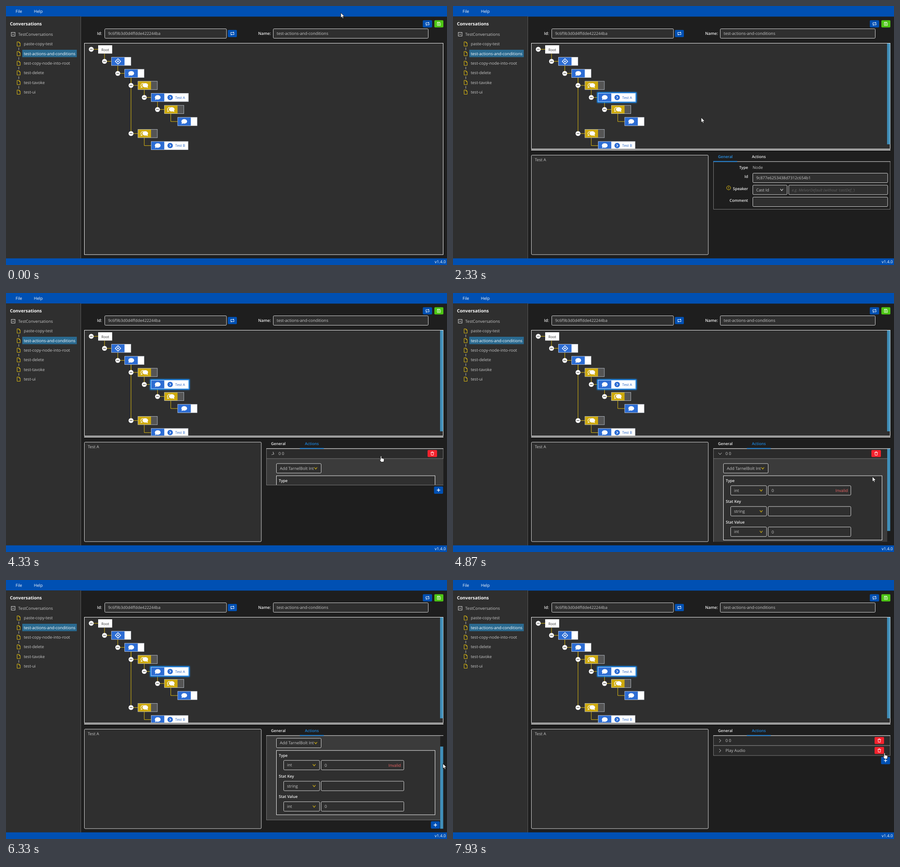
These frames come from a looping animation (976 px wide and 574 px high, 8000 ms). An HTML page:

```html
<!DOCTYPE html>
<html lang="en">
<head>
<meta charset="utf-8">
<title>Conversation editor</title>
<style>
html, body { margin: 0; width: 100%; height: 100%; overflow: hidden; background: #1e1e1e; }
svg { display: block; width: 976px; height: 574px; }
text { font-family: "Open Sans", "Noto Sans", sans-serif; text-rendering: geometricPrecision; white-space: pre; }
</style>
</head>
<body>
<svg id="stage" viewBox="0 0 976 574" xmlns="http://www.w3.org/2000/svg"></svg>
<script>
const BLUE = '#0050b3', PANEL = '#2f2f2f', EDGE = '#d4d4d4', DIM = '#7a7a7a';
const GOLD = '#e0bd12', NODE = '#2c6cd3', SOFT = '#c6c6c6', RED = '#f5222d';

// drawing helpers
const rect = (x, y, w, h, fill, more = '') =>
  `<rect x="${x}" y="${y}" width="${w}" height="${h}" fill="${fill}" ${more}/>`;
const text = (x, y, s, fill = SOFT, size = 9, more = '') =>
  `<text x="${x}" y="${y}" fill="${fill}" font-size="${size}" ${more}>${s}</text>`;
const line = (d, color, w = 1, more = '') =>
  `<path d="${d}" fill="none" stroke="${color}" stroke-width="${w}" ${more}/>`;
const at = (x, y, body) => `<g transform="translate(${x} ${y})">${body}</g>`;
const group = (id, body, more = '') => `<g id="${id}" ${more}>${body}</g>`;
const clip = (id, x, y, w, h) => `<clipPath id="${id}">${rect(x, y, w, h, '#fff')}</clipPath>`;
const bold = 'font-weight="600"', end = 'text-anchor="end"';
const label = (x, y, s, more = '') => text(x, y, s, '#f0f0f0', 8.6, bold + ' ' + more);
const field = (x, y, w, h = 21) => rect(x, y, w, h, PANEL, `stroke="${EDGE}" rx="2"`);
const chevron = (x, y, color) => line(`M${x - 3} ${y - 2}l3 4 3-4`, color, 1.1);
const select = (x, y, w, s, color = GOLD) =>
  field(x, y, w) + text(x + 7.5, y + 13.7, s) + chevron(x + w - 12, y + 10.4, color);
const button = (x, y, w, h, fill, icon) =>
  rect(x, y, w, h, fill, 'rx="2"') + at(x + w / 2, y + h / 2, icon);

// icons, centred on 0,0
const loopIcon = line('M-3.6 .6V-2.3H2.6M3.6-.6V2.3H-2.6', '#fff') +
  '<path d="M2-4.2L4.2-2.3 2-.4ZM-2 4.2L-4.2 2.3-2 .4Z" fill="#fff"/>';
const saveIcon = line('M-3.5-3.5H2L3.5-2V3.5H-3.5ZM-1.8-3.5V-1.5H1.4V-3.5', '#fff', .9) +
  '<circle cy="1.2" r="1.1" fill="none" stroke="#fff" stroke-width=".8"/>';
const fileIcon = line('M-3.4-4.7H.8L3.4-2.1V4.7H-3.4ZM.8-4.7V-2.1H3.4', GOLD);
const trashIcon = line('M-3.7-2.2H3.7M-1.4-2.4V-3.8H1.4V-2.4M-2.7-2L-2.3 3.7H2.3L2.7-2', '#fff', .9);
const plusIcon = line('M-3.7 0H3.7M0-3.7V3.7', '#fff', 1.4);
const bubble = '<ellipse cy="-.2" rx="6.3" ry="5" fill="#fff"/><path d="M-5.4 2Q-5 4-6.2 5.6-4 5.4-2.4 4Z" fill="#fff"/>';
const bubbles = line('M-2-4.6A5 4.4 0 0 0-6.8 2.4L-7.6 4.6-4.2 3.6', '#fff', 1.1) +
  '<ellipse cx="1.7" cy="-.3" rx="6.2" ry="4.8" fill="#fff"/><path d="M6.8 2Q6.5 4 7.6 5.4 5.4 5.2 3.8 4Z" fill="#fff"/>';
const target = line('M0-6L6 0 0 6-6 0Z', '#fff', 1.4) + '<path d="M0-2.2L2.2 0 0 2.2-2.2 0Z" fill="#fff"/>';
const goIcon = `<circle r="6" fill="${NODE}"/>` + line('M-1.2-2.4L1.4 0-1.2 2.4', '#fff', 1.2);

// node tree
const rowY = r => 96 + r * 26.67;
const colX = c => 204 + c * 29.33;
const knob = c => at(colX(c) - 15.3, rowY(c), '<circle r="5.4" fill="#fff"/>' + line('M-3 0H3', '#333', 1.1));
const stem = (c, r0, r1) => line(`M${colX(c) - 15.3} ${rowY(r0) + 9.5}V${rowY(r1)}H${colX(c)}`, GOLD);
function node(c, r, icon, s = '', gold = icon === bubbles) {
  const x = colX(c), y = rowY(r) - 9.2, w = s ? (s.endsWith('A') ? 82.5 : 81.7) : 43;
  return rect(x, y, w, 18.4, gold ? '#555' : '#fff') + rect(x, y, 29, 18.4, gold ? '#cda90c' : NODE) +
    at(x + 14.5, y + 9.2, icon) + rect(x, y, w, 18.4, 'none', 'stroke="#c4cbd6" stroke-width=".8"') +
    (s ? at(x + 42, y + 9.2, goIcon) + text(x + 53.3, y + 12.2, s, '#1d5fc4', 7.8) : '');
}
const chain = [0, 1, 2, 3, 4, 5];
const halo = (w, more = '') => rect(320.8, 193, 83.6, 19.4, 'none', `stroke="#1890ff" stroke-width="${w}" ${more}`);
const tree = line('M188 96H204', GOLD) + chain.map(c => stem(c + 1, c, c + 1)).join('') +
  stem(3, 2, 7) + stem(4, 7, 8) + chain.map(knob).join('') + at(colX(3) - colX(7), 0, knob(7)) +
  rect(204, 87, 31, 18.4, '#fff') + text(211, 99.5, 'Root', '#333', 8) +
  node(1, 1, target) + node(2, 2, bubble) + node(3, 3, bubbles) +
  group('glow', halo(4, 'filter="url(#blur)"') + halo(2)) +
  node(4, 4, bubble, 'Test A') + node(5, 5, bubbles) + node(6, 6, bubble) +
  node(3, 7, bubbles) + node(4, 8, bubble, 'Test B');

// sidebar
const files = ['paste-copy-test', 'test-actions-and-conditions', 'test-copy-node-into-root',
  'test-delete', 'test-tavoke', 'test-ui'];
const sidebar = rect(0, 23, 165, 537, PANEL) + rect(165, 23, 1, 537, '#5a5a5a') +
  text(8.7, 43.2, 'Conversations', '#fff', 9.9, 'font-weight="700"') +
  rect(11.8, 58.5, 8.2, 8.2, 'none', 'stroke="#ddd"') + line('M13.8 62.6H18', '#ddd') +
  text(27, 66.2, 'TestConversations') + rect(36, 97, 120.7, 16.4, '#2a6a90') +
  files.map((s, i) => {
    const y = 84.2 + i * 21.33;
    return at(28, y, fileIcon) + text(39.4, y + 3.2, s, i === 1 ? '#fff' : SOFT) +
      (i ? line(`M28.3 ${y - 13.4}v5.6`, '#bdbdbd') : '');
  }).join('');

const frame = rect(0, 0, 976, 23.5, BLUE) + text(21.3, 15.3, 'File', '#fff') + text(61.8, 15.3, 'Help', '#fff') +
  sidebar + button(922.5, 31.5, 20.5, 16, BLUE, loopIcon) + button(948, 31.5, 20, 16, '#4cc514', saveIcon) +
  text(201.5, 64, 'Id:', '#f0f0f0', 9, bold) + field(218.5, 50.5, 269.5) +
  text(226, 64.2, '9c6f9b3d0d4ffdde422244ba', SOFT, 8.82) + button(491, 53, 20, 16, BLUE, loopIcon) +
  text(558, 64, 'Name:', '#f0f0f0', 9, bold) + field(591.5, 50.5, 343) +
  text(599, 64.2, files[1]) +
  rect(0, 559.3, 976, 14.7, BLUE) + text(973.5, 570, 'v1.4.0', '#fff', 9, end);

// lower panes
const general = line('M576.5 345V450.5H967.5V345', DIM) +
  label(653, 361.2, 'Type', end) + text(663, 361.4, 'Node') +
  label(653, 381.2, 'Id', end) + field(663.5, 370.5, 298.5) + text(671, 384.3, '9c877e6253438d7312c654b1', SOFT, 8.87) +
  label(653, 407.6, 'Speaker', end) +
  at(610, 403, `<circle r="4.4" fill="none" stroke="${GOLD}"/>` + line('M0-2.5V.7M0 1.6V2.6', GOLD, 1.1)) +
  select(663.5, 397, 76, 'Cast Id', '#ddd') + field(743, 397, 219) +
  text(750, 410.7, "e.g. MelvorDefault (without 'castDef_')", '#626262', 8.5, 'font-style="italic"') +
  label(653, 434.4, 'Comment', end) + field(663.5, 423.5, 298.5);

const statRow = (y, name, type, value) => label(603.7, y, name) +
  select(614.5, y + 8, 79.5, type) + field(697.5, y + 8, 183) + text(705, y + 21.9, value);
const body = rect(576, 367, 392, 192, '#3b3b3b') + select(598.5, 378, 99, 'Add TarnelBolt Int') +
  rect(598.5, 405, 351, 142.5, PANEL, 'stroke="#eee"') +
  statRow(419, 'Type', 'int', '0') + text(874, 440.8, 'Invalid', '#f06464', 9, end) +
  statRow(465.2, 'Stat Key', 'string', '') + statRow(510.6, 'Stat Value', 'int', '0');
const header = (y, s) => rect(576.5, y, 391, 22, '#2b2b2b', `stroke="${DIM}"`) + text(603, y + 14, s);
const trash = y => button(933, y + 3, 21, 15.6, RED, trashIcon);
const mark = line('M-2-3.6L2 0-2 3.6', SOFT);
const actions = group('body', body, 'clip-path="url(#fold)"') +
  header(345, '0 0') + group('mark', mark) + group('bin', trash(345)) +
  line('M576.5 345V559', DIM, 1, 'id="sideLine"') + line('M576 0H968', DIM, 1, 'id="endLine"') +
  group('second', header(367, 'Play Audio') + at(591, 378.1, mark) + trash(367)) +
  group('add', button(947.3, 3, 20, 16.3, BLUE, plusIcon));

const split = rect(173, 318, 795, 2, '#dcdcdc') + rect(960.7, 83, 6.6, 223.5, '#408fba') +
  field(173.5, 330.5, 391.5, 220.5) + text(181, 344.2, 'Test A') +
  label(586.5, 337, 'General', 'id="tabA"') + label(661.5, 337, 'Actions', 'id="tabB"') +
  '<g clip-path="url(#pane)">' + group('slide', general + at(392, 0, group('actions', actions))) +
  rect(961, 345, 7, 206.5, '#1e1e1e', 'id="track"') + rect(961, 345, 6.6, 182.3, '#408fba', 'id="thumb"') + '</g>' +
  rect(576, 344.3, 392, 1, '#e4e4e4') + rect(576, 343.6, 53, 1.8, '#1b86e0', 'id="ink"');

const shape = d => `<path d="${d}" fill="#fff" stroke="#111" stroke-width=".85"/>`;
const arrow = shape('M0 0V11.2L2.6 8.8 4.2 12.6 6 11.8 4.4 8.1H8Z');
const hand = shape('M-1.1 1A1.1 1 0 0 1 1.1 1V5L3 5.2 5 5.8Q6.8 5.8 6.8 7.4V10L5.7 13.6H.3L-3 9Q-3.4 7.6-2 7.6L-1.1 8.5Z');

document.getElementById('stage').innerHTML =
  '<defs><filter id="blur" x="-20%" y="-60%" width="140%" height="220%"><feGaussianBlur stdDeviation="1.6"/></filter>' +
  clip('view', 173, 82, 795, 470) + clip('pane', 576, 344, 392, 207.5) + clip('fold', 576, 367, 392, 192) + '</defs>' +
  rect(0, 0, 976, 574, '#1e1e1e') + frame +
  rect(173.5, 82.5, 794, 468.5, PANEL, 'stroke="#f0f0f0" id="box"') +
  `<g clip-path="url(#view)">${tree}</g>` + group('split', split) +
  group('cursor', group('arrow', arrow) + group('hand', hand));

const $ = id => document.getElementById(id);
const set = (id, name, v) => $(id).setAttribute(name, v);
const show = (id, on) => set(id, 'visibility', on ? 'inherit' : 'hidden');
const move = (id, x, y) => set(id, 'transform', `translate(${x} ${y})`);
const clipHeight = (id, h) => $(id).firstChild.setAttribute('height', h);
const clamp = v => Math.max(0, Math.min(1, v));
const ease = u => (u = clamp(u), u < .5 ? 4 * u ** 3 : 1 - 4 * (1 - u) ** 3);

// pointer moves: start, end, x, y; it rests in between
const moves = [
  [67, 200, 947, 118], [200, 267, 1010, 160], [533, 600, 966, 318], [600, 1267, 430, 218],
  [1267, 1400, 400, 209], [1400, 1466, 390, 204.5], [2000, 2066, 400, 208], [2066, 2333, 549, 247],
  [2333, 2667, 723, 342], [2667, 2866, 686, 338], [3533, 4000, 829, 360], [4067, 4133, 830, 361],
  [4533, 4866, 928, 407], [4866, 5133, 966, 383], [5267, 5667, 967, 409], [5667, 6133, 967, 407],
  [6333, 6533, 966, 362], [6666, 7066, 857, 356], [7333, 7866, 955, 383]
];
const overLink = t => t > 1460 && t < 2030 || t > 2900 && t < 4560 || t > 6700;
function pointer(t) {
  let x = 741, y = 15;
  for (const [t0, t1, toX, toY] of moves) {
    const u = clamp((t - t0) / (t1 - t0));
    x += (toX - x) * u;
    y += (toY - y) * u;
    if (u < 1) break;
  }
  return { x, y };
}

function draw(t) {
  const p = pointer(t);
  move('cursor', p.x, p.y);
  show('arrow', !overLink(t));
  show('hand', overLink(t));

  set('glow', 'opacity', t < 1460 ? 0 : t < 1530 ? .5 : 1);
  const open = t > 1790;
  show('split', open);
  set('box', 'height', open ? 234 : 468.5);
  clipHeight('view', open ? 234 : 470);

  // tab switch
  const s = ease((t - 3278) / 300);
  move('slide', -392 * s, 0);
  set('ink', 'x', 576 + 74.3 * s);
  set('tabA', 'fill', t > 3190 ? '#f0f0f0' : '#2a93e8');
  set('tabB', 'fill', t < 2930 ? '#f0f0f0' : t < 2995 ? '#9ccbf5' : t < 3640 ? '#40a9ff' : '#1b86e0');

  // action item folds open and shut
  const k = ease((t - 4240) / 220) - ease((t - 7240) / 220);
  const h = 192 * k, bottom = 367 + h, bar = h > 165.5, shift = bar ? -7 : 0;
  const scroll = t > 5190 && t < 6560 ? clamp((p.y - 383) / 24) : 0;
  const added = t > 7900;
  move('actions', 0, -27.3 * scroll);
  clipHeight('fold', h);
  set('sideLine', 'd', `M576.5 345V${bottom}`);
  set('endLine', 'd', `M576 ${bottom}H968`);
  set('mark', 'transform', `translate(591 356.1) rotate(${90 * k})`);
  move('bin', shift, 0);
  move('add', shift, bottom + (added ? 22 : 0));
  show('second', added);
  show('track', bar);
  show('thumb', bar);
  set('thumb', 'y', 345 + 24.2 * scroll);
}

function tick() {
  const t = performance.now() % 8000;
  draw(Math.floor((t + 5) * .015) / .015 % 8000);
  requestAnimationFrame(tick);
}
tick();
</script>
</body>
</html>
```
